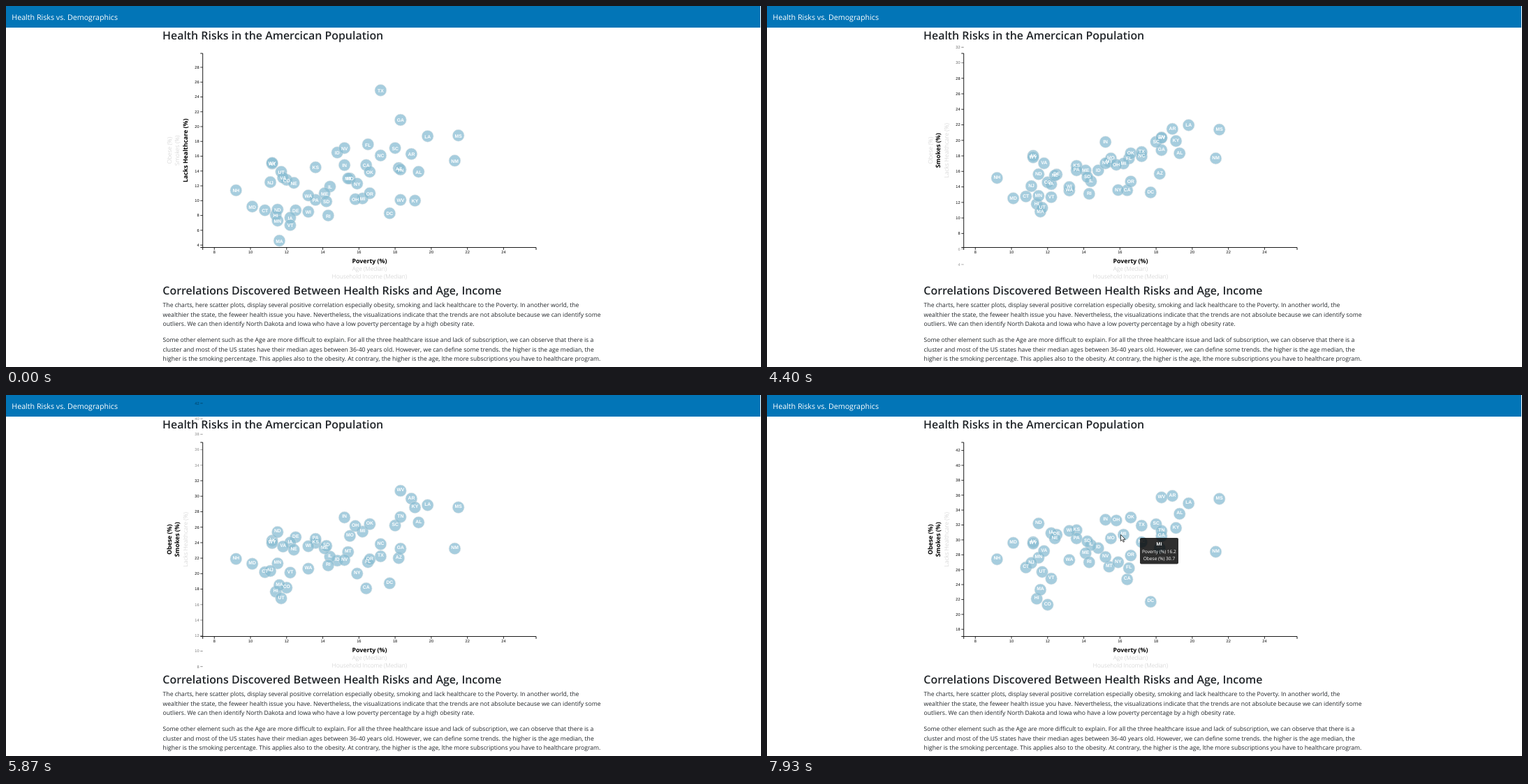
An HTML page that plays this animation: 1081 px wide and 518 px high, repeating every 8000 ms.

```html
<!DOCTYPE html>
<html lang="en">
<head>
<meta charset="utf-8">
<title>Health Risks vs. Demographics</title>
<style>
html, body { margin: 0; width: 100%; height: 100%; overflow: hidden; background: #fff; }
svg { display: block; width: 1081px; height: 518px; font-family: "Open Sans", "Noto Sans", sans-serif; text-rendering: geometricPrecision; }
.nav { font-size: 10.7px; fill: #fff; }
.head { font-size: 15.95px; font-weight: 600; fill: #212529; }
.copy { font-size: 8.62px; fill: #212529; }
.label { font-size: 8.5px; font-weight: 300; fill: #c7c7c7; text-anchor: middle; }
.label.active { font-size: 8.8px; font-weight: 700; fill: #000; }
.axis { fill: none; stroke: #000; stroke-width: .9; }
.tick { font: 5.63px "Liberation Sans", Arial, sans-serif; }
.tick path { stroke: #000; stroke-width: .8; }
.dot { fill: #89bdd3; stroke: #e3e3e3; stroke-width: .56; opacity: .75; }
.state { font: bold 6.8px "Liberation Sans", Arial, sans-serif; fill: #fff; text-anchor: middle; }
.tip { font-size: 6.6px; fill: #fff; text-anchor: middle; }
</style>
</head>
<body>
<svg id="stage" viewBox="0 0 1081 518"></svg>
<script>
const LOOP = 8000;
const LEFT = 281.7, RIGHT = 759, TOP = 68, BOTTOM = 346.5;

const states = ("AL AK AZ AR CA CO CT DE DC FL GA HI ID IL IN IA KS KY LA ME MD MA MI MN MS MO " +
  "MT NE NV NH NJ NM NY NC ND OH OK OR PA RI SC SD TN TX UT VT VA WA WV WI WY").split(" ");
const poverty = [19.3, 11.2, 18.2, 18.9, 16.4, 12, 10.8, 12.5, 17.7, 16.5, 18.3, 11.4, 14.8, 14.4, 15.2, 12.2, 13.6,
  19.1, 19.8, 14.1, 10.1, 11.6, 16.2, 11.5, 21.5, 15.5, 15.4, 12.4, 15.2, 9.2, 11.1, 21.3, 15.9, 17.2,
  11.5, 15.8, 16.6, 16.6, 13.6, 14.3, 18, 14.2, 18.3, 17.2, 11.7, 12.2, 11.8, 13.2, 18.3, 13.2, 11.2];
const uninsured = [13.9, 15, 14.4, 16.3, 14.8, 12.8, 8.7, 8.7, 8.3, 17.6, 20.9, 8.1, 16.5, 11.9, 14.8, 7.7, 14.5,
  10, 18.7, 11, 9.2, 4.6, 10.3, 7.3, 18.8, 13, 13, 12.4, 17.1, 11.4, 12.5, 15.4, 12.3, 16.1,
  8.8, 10.2, 13.9, 11, 10.1, 8, 17.1, 9.9, 14.2, 24.9, 13.9, 6.7, 13.1, 10.7, 10.1, 8.5, 15.1];
const smokes = [21.1, 19.9, 16.5, 24.7, 12.8, 15.7, 15.3, 19.9, 16.4, 17.7, 17.4, 14.1, 15.9, 16.5, 22.9, 18.5, 18.1,
  26.1, 24, 19.3, 14.6, 14.7, 21.2, 16.3, 23, 20.6, 19.9, 17.4, 17, 17.5, 15.1, 19.1, 14.4, 19.1,
  19.9, 21, 21.1, 17, 19.9, 16.3, 21.5, 18.6, 24.2, 14.5, 9.7, 16.4, 19.5, 15.3, 26.7, 17.4, 19.5];
const obese = [33.5, 29.7, 28.9, 35.9, 24.7, 21.3, 26.3, 30.7, 21.7, 26.2, 30.5, 22.1, 28.9, 29.3, 32.7, 30.9, 31.3,
  31.6, 34.9, 28.2, 29.6, 23.3, 30.7, 27.6, 35.5, 30.2, 26.4, 30.2, 27.7, 27.4, 26.9, 28.4, 27, 29.7,
  32.2, 32.6, 33, 27.9, 30.2, 27, 32.1, 29.8, 31.2, 31.9, 25.7, 24.8, 28.5, 27.3, 35.7, 31.2, 29.5];

const lerp = (a, b, k) => a + (b - a) * k;
const clamp = k => Math.max(0, Math.min(1, k));
const cubic = k => k < .5 ? 4 * k ** 3 : 1 - 4 * (1 - k) ** 3;
const progress = (t, start, span) => clamp((t - start) / span);

function scale(data, from, to) {
  const lo = Math.min(...data) * .8, hi = Math.max(...data) * 1.2;
  const map = v => from + (v - lo) / (hi - lo) * (to - from);
  map.has = v => v >= lo && v <= hi;
  return map;
}
const xOf = scale(poverty, LEFT, RIGHT);
const views = [[uninsured, .6], [smokes, -1.6], [obese, -1.6]]
  .map(([data, shift]) => ({ data, shift, y: scale(data, BOTTOM, TOP) }));
const CLICKS = [3866, 5384];

const stage = document.getElementById("stage");
function add(tag, attrs, text, parent = stage) {
  const node = document.createElementNS("http://www.w3.org/2000/svg", tag);
  for (const key in attrs) node.setAttribute(key, attrs[key]);
  if (text) node.textContent = text;
  parent.appendChild(node);
  return node;
}
const write = (cls, x, y, text, parent) => add("text", { class: cls, x, y }, text, parent);

// Page
add("rect", { width: 1080, height: 31, fill: "#0275b7" });
write("nav", 8.3, 19.8, "Health Risks vs. Demographics");
write("head", 224, 48, "Health Risks in the Amercican Population");
write("head", 224.3, 413.9, "Correlations Discovered Between Health Risks and Age, Income");
[
  "The charts, here scatter plots, display several positive correlation especially obesity, smoking and lack healthcare to the Poverty. In another world, the",
  "wealthier the state, the feweer health issue you have. Nevertheless, the visualizations indicate that the trends are not absolute because we can identify some",
  "outliers. We can then identify North Dakota and Iowa who have a low poverty percentage by a high obesity rate.",
  "Some other element such as the Age are more difficult to explain. For all the three healthcare issue and lack of subscription, we can observe that there is a",
  "cluster and most of the US states have their median ages between 36-40 years old. However, we can define some trends. the higher is the age median, the",
  "higher is the smoking percentage. This applies also to the obesity. At contrary, the higher is the age, lthe more subscriptions you have to healthcare program."
].forEach((line, i) => write("copy", 224.6, 432.3 + 13.5 * i + (i > 2 ? 9.2 : 0), line));

// Axes
add("path", { class: "axis", d: `M${LEFT - 3.4} ${TOP}H${LEFT}V${BOTTOM}H${LEFT - 3.4}M${LEFT} ${BOTTOM + 3.4}V${BOTTOM}H${RIGHT}V${BOTTOM + 3.4}` });
for (let v = 8; v <= 24; v += 2) {
  const g = add("g", { class: "tick", transform: `translate(${xOf(v)} ${BOTTOM})`, "text-anchor": "middle" });
  add("path", { d: "M0 0V3.4" }, "", g);
  add("text", { y: 8.8 }, v, g);
}
const ticks = [];
for (let v = 4; v <= 42; v += 2) {
  const node = add("g", { class: "tick", "text-anchor": "end" });
  add("path", { d: "M0 0H-3.4" }, "", node);
  add("text", { x: -5.1, y: 1.9 }, v, node);
  ticks.push({ v, node });
}

write("label active", 520.4, 368.6, "Poverty (%)");
write("label", 520.4, 380.2, "Age (Median)");
write("label", 520.4, 391.3, "Household Income (Median)");
const [lackLabel, smokeLabel, obeseLabel] = [["Lacks Healthcare (%)", 259.6], ["Smokes (%)", 248.3], ["Obese (%)", 237]]
  .map(([text, x]) => add("text", { class: "label", transform: `translate(${x} 207.3) rotate(-90)` }, text));

// Points
const dots = states.map((_, i) => add("circle", { class: "dot", r: 8.45, cx: xOf(poverty[i]) }));
const names = states.map((name, i) => write("state", xOf(poverty[i]), 0, name));

const tip = add("g", { class: "tip" });
add("rect", { x: 534, y: 205, width: 55, height: 37.6, rx: 2, fill: "#000", opacity: .82 }, "", tip);
write("", 561.4, 216.2, "MI", tip).setAttribute("font-weight", 700);
write("", 561.4, 226.7, "Poverty (%) 16.2", tip);
write("", 561.4, 237, "Obese (%) 30.7", tip);

// Pointer
const arrow = add("path", { d: "M0 0V9.2L2.1 7.3 3.6 10.7 5 10.1 3.6 6.8H6.5Z", fill: "#fff", stroke: "#000", "stroke-width": .7 });
const beam = add("path", { d: "M0 0H1.6L2 .5 2.4 0H4M2 .5V9.5M0 10H1.6L2 9.5 2.4 10H4", fill: "none", stroke: "#000", "stroke-width": .7 });
// Each path: shape, end of visibility, then time, x, y
const trails = [
  [beam, 730, [470, 720, 507.5], [530, 717.5, 507]],
  [beam, 1530, [1130, 470, 498], [1200, 437, 458], [1270, 405, 420]],
  [arrow, 3140, [1530, 385, 390], [1880, 223, 250], [1980, 230, 252], [2330, 369.7, 327.3], [2400, 369.7, 327.3],
    [2540, 508, 357], [2600, 490, 350], [2930, 242, 244], [3070, 242, 243], [3140, 241, 232]],
  [arrow, LOOP, [6800, 240, 226], [6930, 389, 266], [7270, 389, 266], [7400, 460, 222], [7530, 503, 201],
    [7670, 503, 201], [7930, 506.5, 200.4]]
];

function drawPointer(t) {
  for (const shape of [arrow, beam]) shape.style.display = "none";
  const trail = trails.find(([, end, first]) => t >= first[0] && t < end);
  if (!trail) return;
  const [shape, , ...keys] = trail;
  let i = 0;
  while (i < keys.length - 1 && keys[i + 1][0] <= t) i++;
  const a = keys[i], b = keys[i + 1] || a;
  const k = b === a ? 0 : progress(t, a[0], b[0] - a[0]);
  shape.style.display = "";
  shape.setAttribute("transform", `translate(${lerp(a[1], b[1], k)} ${lerp(a[2], b[2], k)})`);
}

function setLabel(node, active, darkness) {
  const c = Math.round(lerp(199, 0, darkness));
  node.classList.toggle("active", active);
  node.style.fill = `rgb(${c},${c},${c})`;
}

function draw(t) {
  const step = t < CLICKS[1] ? 0 : 1;
  const from = views[step], to = views[step + 1];
  const k = cubic(progress(t, CLICKS[step], 1000));

  for (const { v, node } of ticks) {
    const opacity = lerp(+from.y.has(v), +to.y.has(v), k);
    node.setAttribute("transform", `translate(${LEFT} ${lerp(from.y(v), to.y(v), k)})`);
    node.setAttribute("opacity", opacity);
  }
  states.forEach((_, i) => {
    const y = lerp(from.y(from.data[i]), to.y(to.data[i]), k);
    dots[i].setAttribute("cy", y);
    names[i].setAttribute("y", y + 2.4 + lerp(from.shift, to.shift, k));
  });

  setLabel(lackLabel, t < CLICKS[0], 1 - progress(t, CLICKS[0], 270));
  setLabel(smokeLabel, t >= CLICKS[0], progress(t, 3140, 270));
  setLabel(obeseLabel, t >= CLICKS[1], progress(t, 4900, 230));
  tip.style.display = t >= 7500 ? "" : "none";
  drawPointer(t);
}

const start = performance.now();
function frame() {
  draw((performance.now() - start) % LOOP);
  requestAnimationFrame(frame);
}
draw(0);
requestAnimationFrame(frame);
</script>
</body>
</html>
```
